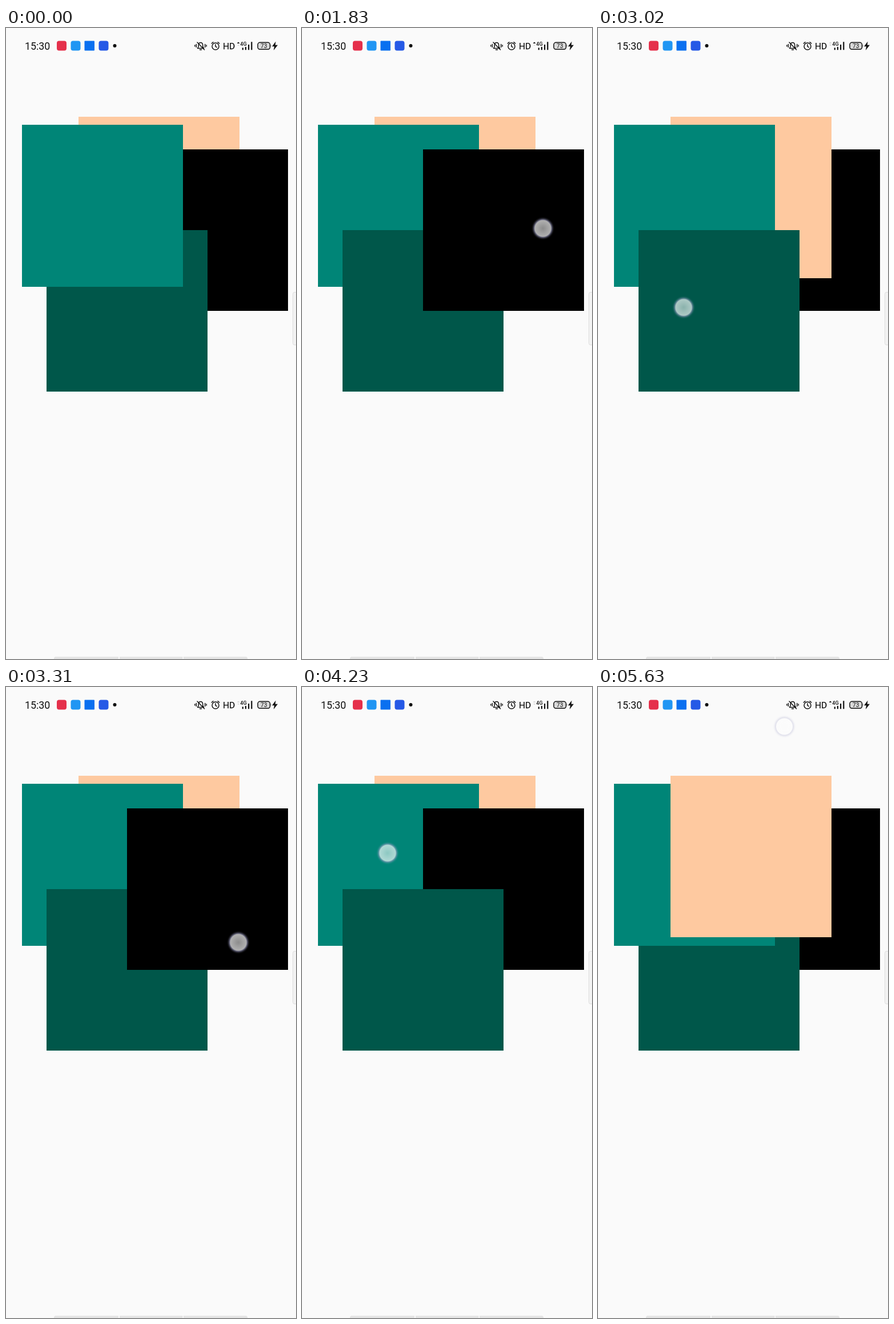
Write an HTML page that moves like this. It is 508 px wide and 1102 px high and loops after 5.65 s.

```html
<!DOCTYPE html>
<html lang="en">
<head>
<meta charset="utf-8">
<title>Tap to front</title>
<style>
  html, body { margin: 0; width: 100%; height: 100%; overflow: hidden; background: #fafafa; }
  #stage { position: relative; width: 508px; height: 1102px; overflow: hidden; isolation: isolate; }
  .card { position: absolute; width: 282.2px; height: 282.2px; }
  svg { position: absolute; left: 0; top: 0; z-index: 9000; font-family: Roboto, sans-serif; }
</style>
</head>
<body>
<div id="stage">
  <svg width="508" height="1102" viewBox="0 0 508 1102" fill="#111">
    <defs>
      <radialGradient id="glow">
        <stop offset="0" stop-color="#fff" stop-opacity=".55"/>
        <stop offset=".7" stop-color="#fff" stop-opacity=".69"/>
        <stop offset=".75" stop-color="#b4b4d2" stop-opacity=".66"/>
        <stop offset=".82" stop-color="#a0a0c8" stop-opacity=".4"/>
        <stop offset=".9" stop-color="#a0a0c8" stop-opacity=".12"/>
        <stop offset="1" stop-color="#a0a0c8" stop-opacity="0"/>
      </radialGradient>
    </defs>

    <!-- status bar, left -->
    <text x="33" y="37.5" font-size="17.8">15:30</text>
    <rect x="89" y="22.5" width="17" height="17" rx="4" fill="#e5304b"/>
    <rect x="113.5" y="22.5" width="17" height="17" rx="4" fill="#2196f3"/>
    <rect x="137.5" y="22.5" width="17.5" height="17" rx="1" fill="#0a70f0"/>
    <rect x="162.5" y="22.5" width="17" height="17" rx="4" fill="#2559e6"/>
    <circle cx="190.5" cy="31" r="3"/>

    <!-- muted bell and alarm clock -->
    <g fill="none" stroke="#111" stroke-width="1.5" stroke-linecap="round" stroke-linejoin="round">
      <path d="M335.5 35.5H346.5L344.7 32.5V29.5Q344.2 25.5 341 25.5Q337.6 25.5 337.2 29.5V32.5ZM339.5 38H342.5M335 25L347.5 38M333.3 28.5V33.5M330.8 30V32M348.7 28.5V33.5M351.2 30V32"/>
      <circle cx="367" cy="32" r="6"/>
      <path d="M367 28.8V32.3L369.3 33.6M360.2 27L363 24.7M373.8 27L371 24.7"/>
    </g>
    <text x="380" y="37" font-size="15.5" textLength="" stroke="#111" stroke-width=".25">HD</text>

    <!-- network -->
    <path id="up" d="M404.6 27L407 24.3L409.4 27Z"/>
    <path d="M405 29L407 31.3L409 29Z" fill="#d8d8d8"/>
    <text x="410.3" y="31.2" font-size="9" font-weight="500">4G</text>
    <path d="M413.7 34.5h2.2v3.8h-2.2zM418.8 33h2.2v5.3h-2.2zM424 29h2.2v9.3h-2.2zM429.2 24.2h2.2v14.1h-2.2z"/>

    <!-- battery -->
    <rect x="441" y="25.3" width="21.5" height="12" rx="3.8" fill="#dadada" stroke="#111" stroke-width="1.5"/>
    <path d="M463.8 29.3Q465.4 31.3 463.8 33.3Z"/>
    <text x="451.7" y="34.9" font-size="10" text-anchor="middle">73</text>
    <path d="M472.5 23.5L466 32.2H470L468.8 39L476 29.7H471.7Z"/>

    <!-- edge handle and navigation hints -->
    <rect x="502.5" y="461.5" width="9" height="92" rx="3" fill="#f3f3f3" stroke="#dcdcdc"/>
    <path d="M86 1098H197V1102H84V1100ZM199 1098H309.5V1102H199ZM311 1098H421L423 1100V1102H311Z" fill="#e5e5e5"/>

    <circle id="dot" r="20" fill="url(#glow)"/>
  </svg>
</div>
<script>
const LOOP = 5650, FLIP = 110, RELEASE = 170, FADE = 60, DP = 1.4111;
const stage = document.getElementById('stage');
const dot = document.getElementById('dot');
const up = document.getElementById('up');

// Bottom to top at the start; position in dp.
const cards = [
  ['peach', 90, 110, '#fec9a0'],
  ['black', 150, 150, '#000'],
  ['dark', 50, 250, '#00574a'],
  ['teal', 20, 120, '#008577']
].map(([name, x, y, color]) => {
  const el = document.createElement('div');
  el.className = 'card';
  el.style.cssText = `left:${x * DP}px;top:${y * DP}px;background:${color}`;
  stage.appendChild(el);
  return { name, el };
});

// Press time, tapped card, and the visible touch point if there is one.
const taps = [
  [1080, 'dark', 250, 503],
  [1700, 'black', 422, 350],
  [2100, 'peach'],
  [2560, 'teal'],
  [2850, 'dark', 150, 488],
  [3170, 'black', 407, 446],
  [3850, 'dark', 201.5, 520],
  [4150, 'teal', 150, 290],
  [4440, 'peach', 369.5, 178]
];
const hold = { start: 4900, release: 5470, x: 326.5, y: 69 };

function showDot(x, y, alpha) {
  dot.setAttribute('cx', x);
  dot.setAttribute('cy', y);
  dot.setAttribute('opacity', alpha);
}

function draw(t) {
  cards.forEach(({ name, el }, i) => {
    const last = taps.filter(([at, card]) => card === name && at + FLIP <= t).pop();
    el.style.zIndex = last ? last[0] : i;
  });

  const tap = taps.find(([at, , x]) => x && t >= at && t < at + RELEASE + FADE);
  if (tap) {
    showDot(tap[2], tap[3], Math.min(1, 1 - (t - tap[0] - RELEASE) / FADE));
  } else if (t >= hold.start) {
    showDot(hold.x, hold.y, 1 - 0.5 * Math.max(0, t - hold.release) / 160);
  } else {
    showDot(0, 0, 0);
  }

  up.setAttribute('fill', t > 3000 && t < 4900 ? '#d8d8d8' : '#111');
}

function tick() {
  draw(performance.now() % LOOP);
  requestAnimationFrame(tick);
}
tick();
</script>
</body>
</html>
```
